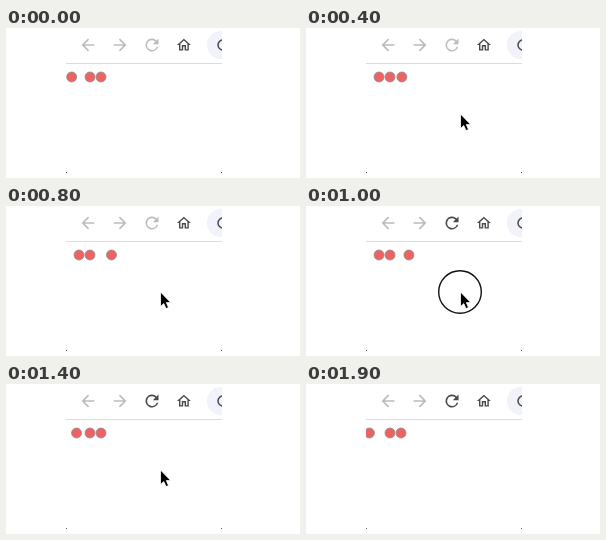
Recreate the animation shown at these times as an HTML page. Size 294 by 150 pixels, loop 2 s.

```html
<!DOCTYPE html>
<html lang="en">
<head>
<meta charset="utf-8">
<title>Swinging dots</title>
<style>
html, body { margin: 0; width: 100%; height: 100%; overflow: hidden; background: #fff; }
svg { display: block; width: 100%; height: 100%; }
</style>
</head>
<body>
<svg viewBox="0 0 294 150">
  <defs>
    <clipPath id="view"><rect x="60" width="156" height="145"/></clipPath>
    <path id="arrow" d="M20 11H7.83l5.59-5.59L12 4l-8 8 8 8 1.41-1.41L7.83 13H20z"/>
  </defs>
  <g clip-path="url(#view)">
    <path d="M60 35.5H216" stroke="#dcdcde"/>
    <use href="#arrow" transform="translate(72.4 7.4) scale(.8)" fill="#bcbcbc"/>
    <use href="#arrow" transform="translate(123.6 7.4) scale(-.8 .8)" fill="#bcbcbc"/>
    <path id="reload" transform="translate(136.3 7.3) scale(.81)" d="M17.65 6.35A8 8 0 1 0 19.73 14h-2.08A6 6 0 1 1 12 6c1.66 0 3.14.69 4.22 1.78L13 11h7V4z"/>
    <path transform="translate(169.5 8.6) scale(.7)" fill="#48494b" d="M12 5.69l5 4.5V18h-2v-6H9v6H7v-7.81l5-4.5M12 3L2 12h3v8h6v-6h2v6h6v-8h3z"/>
    <rect x="201" y="3" width="40" height="28" rx="14" fill="#f1f2fa"/>
    <circle cx="217" cy="17" r="5" fill="none" stroke="#48494b" stroke-width="1.5"/>
    <g fill="#ed6262" stroke="#909090" stroke-width=".8">
      <circle id="left" cy="49" r="5"/>
      <circle cx="84" cy="49" r="5"/>
      <circle id="right" cy="49" r="5"/>
    </g>
    <circle id="ring" cx="154" cy="86" r="21.3" fill="none" stroke="#111" stroke-width="1.4"/>
    <path id="cursor" d="M0 0V14.6L3.3 11.6L5.5 16.6L8 15.5L5.8 10.6H10.2Z" fill="#000" stroke="#fff" stroke-width=".8"/>
    <path d="M60 144h1v1h-1zM215 144h1v1h-1z" fill="#555"/>
  </g>
</svg>
<script>
const LOOP = 2000, STEP = 100, REACH = 10.5;
const $ = id => document.getElementById(id);
const clamp = v => Math.min(1, Math.max(0, v));
const show = (el, on) => el.setAttribute('visibility', on ? 'visible' : 'hidden');

// Decelerates outward, then accelerates back to rest.
function swing(t, start, peak, end) {
  if (t <= start || t >= end) return 0;
  return REACH * (t < peak
    ? Math.sin((t - start) / (peak - start) * Math.PI / 2)
    : 1 - Math.pow((t - peak) / (end - peak), 2.5));
}

function cursorY(t) {
  const enter = 1 - clamp((t - 100) / 300);
  const leave = clamp((t - 1400) / 400);
  return 86 + 78 * enter * enter + 62 * Math.pow(leave, 2.2);
}

function draw(t) {
  const late = t < 400 ? t + LOOP : t;
  $('left').setAttribute('cx', 73 - swing(late, 1340, 1740, 2160));
  $('right').setAttribute('cx', 95 + swing(t, 380, 760, 1180));
  $('reload').setAttribute('fill', t >= 1000 ? '#48494b' : '#bcbcbc');
  show($('ring'), t >= 900 && t < 1100);
  show($('cursor'), t >= 200 && t < 1800);
  $('cursor').setAttribute('transform', `translate(154.5 ${cursorY(t)})`);
}

const begin = performance.now();
function tick() {
  const t = (performance.now() - begin) % LOOP;
  draw(Math.floor(t / STEP) * STEP);
  requestAnimationFrame(tick);
}
tick();
</script>
</body>
</html>
```
